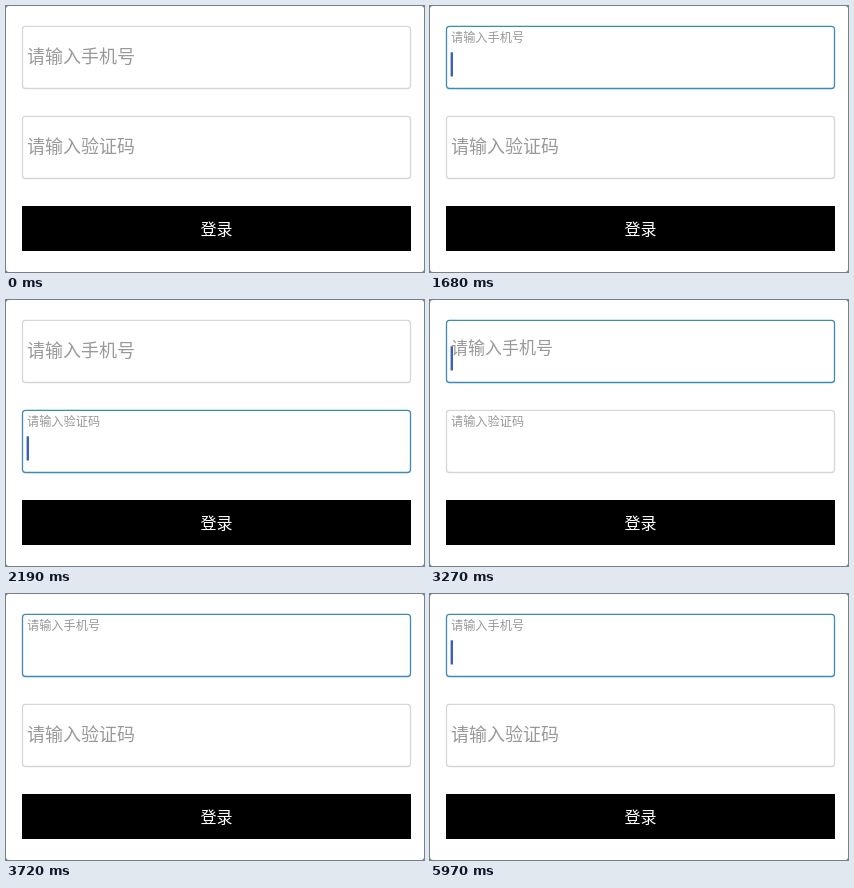
An HTML page with a canvas for the animation above (6 s loop, 418 px wide and 266 px high).

```html
<!DOCTYPE html>
<html lang="zh-CN">
<head>
<meta charset="utf-8">
<style>
  html, body { margin: 0; width: 100%; height: 100%; overflow: hidden; background: #fff; }
  canvas { display: block; width: 418px; height: 266px; }
</style>
</head>
<body>
<canvas id="stage" width="418" height="266"></canvas>
<script>
const W = 418, H = 266, LOOP = 6000, TICK = 30, RAMP = 180;
const CJK = '"Noto Sans CJK SC", "Noto Sans CJK", sans-serif';
const ctx = document.getElementById('stage').getContext('2d');

const fields = [
  { y: 20, hint: '请输入手机号', focus: [[810, 1980], [3270, LOOP]], float: [[780, 2010], [3240, LOOP]] },
  { y: 110, hint: '请输入验证码', focus: [[1980, 3270]], float: [[1950, 3300]] }
];
const caretOff = [[1260, 1680], [2430, 2880], [3720, 3810], [4800, 5070], [5520, 5970]];
const typed = [[0, ''], [3810, '1'], [3990, '12'], [4350, '123'], [5070, '']];

const inside = (spans, t) => spans.some(([a, b]) => t >= a && t < b);
const clamp = v => Math.max(0, Math.min(1, v));
const mix = (a, b, p) => a + (b - a) * p;

// 0 = resting hint, 1 = small floating label
function floatAmount(spans, t) {
  return spans.reduce((p, [a, b]) =>
    Math.max(p, Math.min(clamp((t - a) / RAMP), 1 - clamp((t - b) / RAMP))), 0);
}

function text(str, x, y, size, color, family = CJK, align = 'left') {
  ctx.font = `${size}px ${family}`;
  ctx.fillStyle = color;
  ctx.textAlign = align;
  ctx.fillText(str, x, y);
}

function box(x, y, w, h, r) {
  ctx.beginPath();
  ctx.roundRect(x, y, w, h, r);
}

function clearButton(x, y) {
  ctx.fillStyle = '#b9b9b9';
  ctx.beginPath();
  ctx.arc(x, y, 11.2, 0, Math.PI * 2);
  ctx.fill();
  ctx.strokeStyle = '#fff';
  ctx.lineWidth = 2;
  ctx.beginPath();
  ctx.moveTo(x - 4.4, y - 4.4);
  ctx.lineTo(x + 4.4, y + 4.4);
  ctx.moveTo(x + 4.4, y - 4.4);
  ctx.lineTo(x - 4.4, y + 4.4);
  ctx.stroke();
}

function drawField(field, value, t) {
  const { y, hint } = field;
  const focused = inside(field.focus, t);
  const p = floatAmount(field.float, t);

  box(16.5, y + 0.3, 388, 62.2, 3);
  ctx.strokeStyle = focused ? '#3f8ab5' : '#d6d6d6';
  ctx.lineWidth = 1.3;
  ctx.stroke();

  text(hint, 21, mix(y + 37.3, y + 15.8, p), mix(18, 12.2, p), '#999');
  if (value) {
    text(value, 20.6, y + 45.6, 18, '#222', 'Roboto, sans-serif');
    clearButton(382, y + 39);
  }
  if (focused && !inside(caretOff, t)) {
    ctx.fillStyle = '#3a5fc0';
    ctx.fillRect(20.6 + value.length * 10.1, y + 26.3, 2.4, 24.2);
  }
}

function draw(t) {
  ctx.fillStyle = '#777';
  ctx.fillRect(0, 0, W, H);
  ctx.fillStyle = '#fff';
  box(0, 0, W, H, 3);
  ctx.fill();

  const value = typed.filter(([at]) => t >= at).pop()[1];
  drawField(fields[0], value, t);
  drawField(fields[1], '', t);

  ctx.fillStyle = '#000';
  ctx.fillRect(16, 200, 389, 45);
  text('登录', 210.5, 228.8, 16, '#fff', CJK, 'center');
}

const start = performance.now();
function loop() {
  const t = (performance.now() - start) % LOOP;
  draw(Math.floor(t / TICK) * TICK);
  requestAnimationFrame(loop);
}
loop();
</script>
</body>
</html>
```
